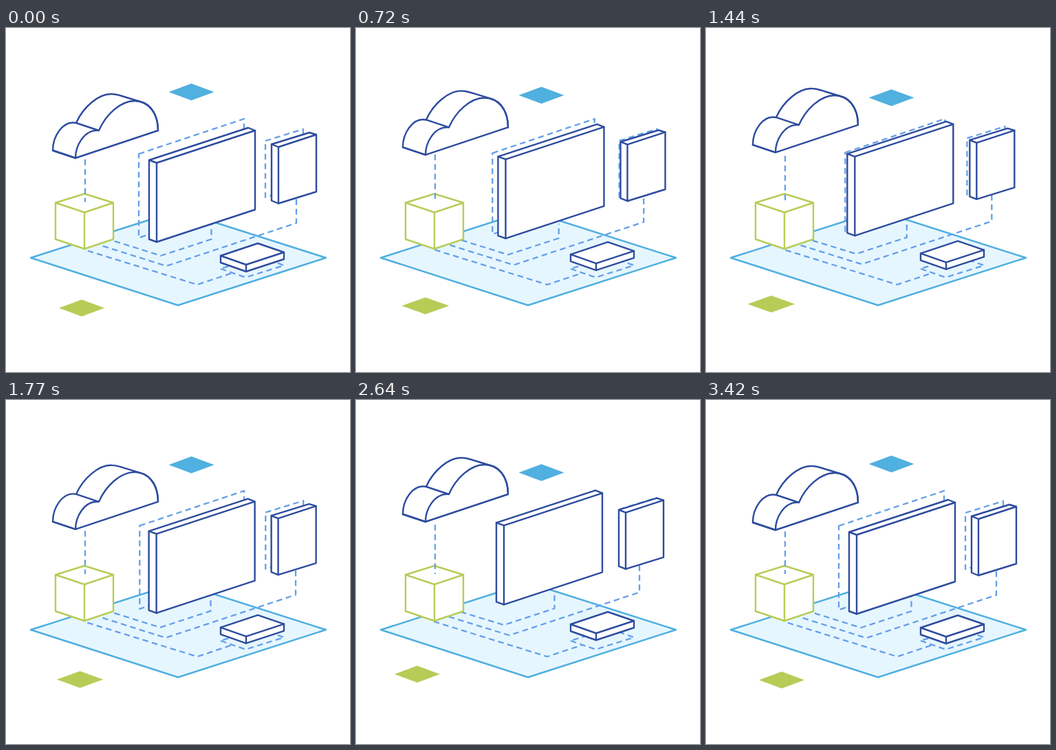
An HTML page that plays this animation: 500x500 px, repeating every 3.45 s.

```html
<!DOCTYPE html>
<html lang="en">
<head>
<meta charset="utf-8">
<title>Connected devices</title>
<style>
  html, body { margin: 0; width: 100%; height: 100%; overflow: hidden; background: #fff; }
  svg { display: block; width: 100vw; height: 100vh; }
  path { stroke-width: 2.4; stroke-linejoin: round; stroke-linecap: round; }
  .solid { fill: #fff; stroke: #2d4c9e; }
  .line { fill: none; stroke: #2d4c9e; }
  .cube { fill: #fff; stroke: #b6cd56; }
  .dash { fill: none; stroke: #649fe9; stroke-width: 2.3; stroke-dasharray: 8.5 5.5; stroke-linecap: butt; }
  .mat { fill: #e6f6ff; stroke: #4fafdf; }
</style>
</head>
<body>
<svg viewBox="0 0 500 500">
  <path class="mat" d="M36 334L250 265.500L465 334L250 403Z"/>
  <path id="blue" fill="#50b0df"/>
  <path id="green" fill="#b5cd57"/>

  <path class="dash" id="screenWire"/>
  <path class="dash" id="phoneWire"/>
  <path class="dash" id="tabletWire" d="M113 322L278 373L329 356"/>
  <path class="dash" d="M312 350L348.500 362.500L404 345L367 332Z"/>

  <path class="cube" d="M114 241L156 254V307L114 321L72 307V254Z"/>
  <path class="cube" d="M72 254L114 268L156 254M114 268V321"/>
  <path class="dash" id="cloudWire"/>

  <g id="cloud">
    <path class="solid" d="M68 178C68 158 82 134 102 138C112 115 135 95 154 96C160 96 166 98 172 100L195 107C212 111 221 128 221 149L101 189Z"/>
    <path class="line" d="M68 178L101 189C101 172 113 147 135 149C145 126 166 106 187 106C207 106 221 124 221 149M102 138L135 149"/>
  </g>

  <path class="dash" id="screenShadow"/>
  <g id="screen">
    <path class="solid" d="M208 192L352 145L362 149V264L219 311L208 307Z"/>
    <path class="line" d="M208 192L219 196L362 149M219 196V311"/>
  </g>

  <path class="dash" id="phoneShadow" d="M377 164L432 147V229L377 246Z"/>
  <g id="phone">
    <path class="solid" d="M386 169L441 152L451 155V238L396 255L386 251Z"/>
    <path class="line" d="M386 169L396 173L451 155M396 173V255"/>
  </g>

  <g id="tablet">
    <path class="solid" d="M312 331L366 313L404 326V336L349 354L312 341Z"/>
    <path class="line" d="M312 331L349 344L404 326M349 344V354"/>
  </g>
</svg>
<script>
const LOOP = 3450, HOLD = 420, CYCLE = 1500, FLOAT_PEAK = 720, DASH_PEAK = 500;
const el = id => document.getElementById(id);
const ease = u => u * u * (3 - 2 * u);
// Rises from 0 to 1 until peak, then falls back by the end of the cycle.
const swing = (t, peak) => ease(t < peak ? t / peak : (CYCLE - t) / (CYCLE - peak));
const move = (id, x, y) => el(id).setAttribute("transform", `translate(${x} ${y})`);
const trace = (id, d) => el(id).setAttribute("d", d);
const diamond = (id, x, y, w) =>
  trace(id, `M${x - w} ${y}L${x} ${y - 12.2}L${x + w} ${y}L${x} ${y + 12.2}Z`);

function draw(now) {
  const t = now % LOOP;
  const phase = t < HOLD ? 0 : (t - HOLD) % CYCLE;
  const p = swing(phase, FLOAT_PEAK);
  const q = swing(phase, DASH_PEAK);
  const bulge = p * (1 - p);

  move("cloud", 0, -12 * p);
  move("screen", -4 * p, -13.7 * p);
  move("phone", -4 * p, -9.3 * p);
  move("phoneShadow", 11 * q - 4 * p, 5 * q - 9.3 * p);
  move("tablet", 0, -5 * p);
  diamond("blue", 269.5, 93 + 12.5 * p, 33);
  diamond("green", 110 - 21 * p - 5 * bulge, 407 - 8.5 * p, 33 + 6 * bulge);

  const left = 193 + 14 * p, right = 346 + 2 * p;
  trace("screenShadow", `M${left} ${183 - 3 * p}L${right} 132V${254 - 12 * p}L${left} ${305 - 14 * p}Z`);

  const dx = -10 * p, dy = -4 * p;
  trace("screenWire", `M152 308L${225 + dx} ${331 + dy}L${298.5 + dx} ${307 + dy}V${286 + dy}`);
  trace("phoneWire", `M135 315L${233 + dx} ${346 + dy}L${422 + dx} ${283.5 + dy}V240`);
  trace("cloudWire", `M115 ${191 - 11 * q}V253`);
  for (const id of ["screenWire", "phoneWire", "tabletWire"])
    el(id).setAttribute("stroke-dashoffset", 7 * q - 6);

  requestAnimationFrame(draw);
}
requestAnimationFrame(draw);
</script>
</body>
</html>
```
